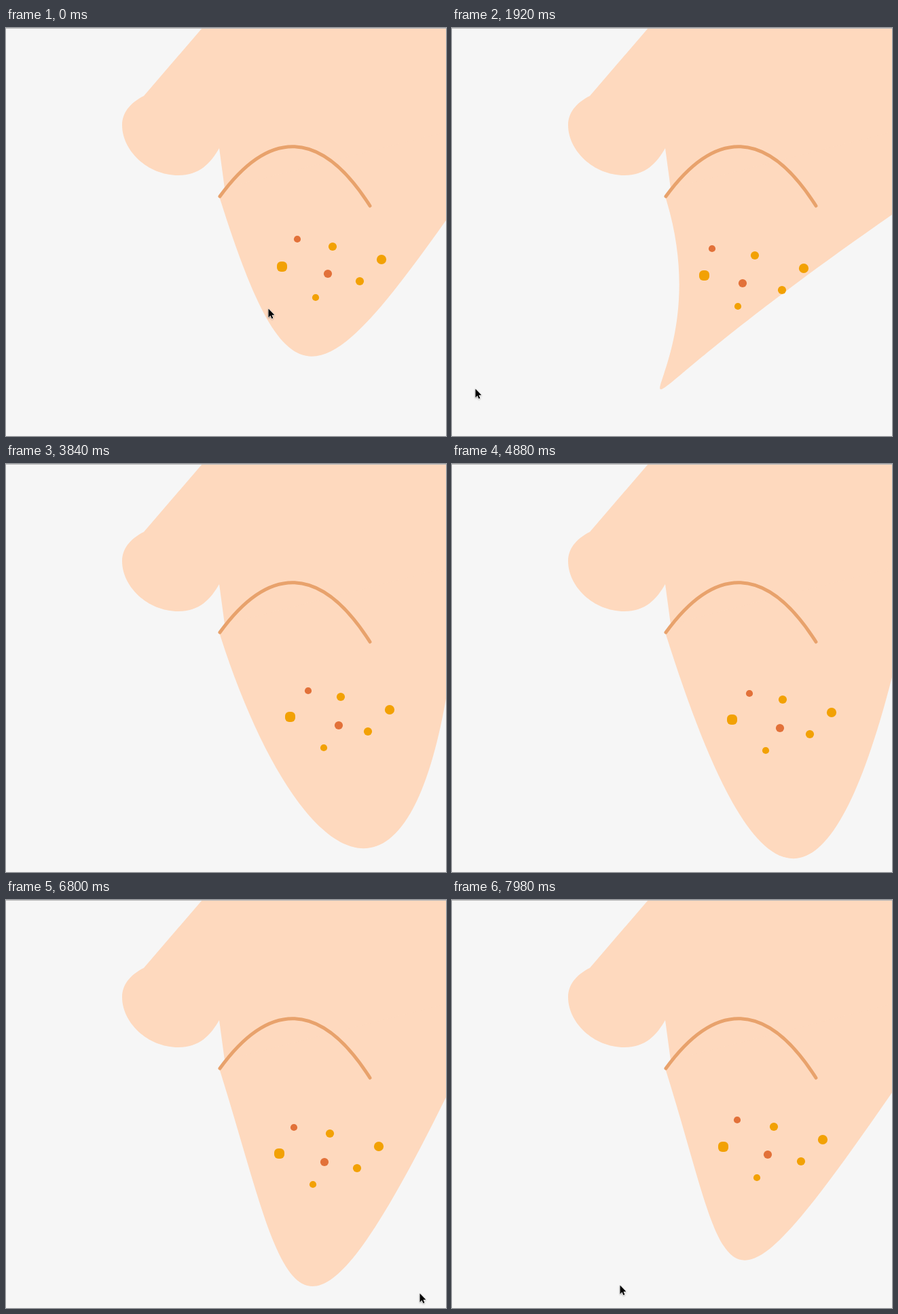
Recreate the animation shown at these times as an HTML page. Size 648 by 601 pixels, loop 8000 ms.

```html
<!DOCTYPE html>
<html lang="en">
<head>
<meta charset="utf-8">
<title>Wobbly chin</title>
<style>
  html, body { margin: 0; width: 100%; height: 100%; overflow: hidden; background: #f6f6f6; }
  svg { display: block; width: 100%; height: 100%; }
</style>
</head>
<body>
<svg viewBox="0 0 648 601">
  <defs>
    <filter id="shade" x="-50%" y="-50%" width="200%" height="200%">
      <feDropShadow dx="0" dy="1" stdDeviation="0.8" flood-color="#000" flood-opacity="0.35"/>
    </filter>
  </defs>
  <rect width="648" height="601" fill="#f6f6f6"/>
  <g fill="#fed9be">
    <path d="M289 0L203 100C187 108 171 122 171 143C171 180 208 217 254 217C284 217 301 200 314 177L322 236L420 300L660 267V0Z"/>
    <path id="chin"/>
  </g>
  <path d="M315 248C387 149 463 147 536 262" fill="none" stroke="#e8a26c" stroke-width="5" stroke-linecap="round"/>
  <g id="amber" fill="#f2a104">
    <circle cx="481" cy="322" r="6.1"/>
    <circle cx="553" cy="341" r="7.1"/>
    <rect x="399" y="344" width="15" height="15" rx="6"/>
    <circle cx="521" cy="373" r="6.1"/>
    <circle cx="456" cy="397" r="5.1"/>
  </g>
  <g id="red" fill="#e27139">
    <circle cx="429" cy="311" r="5.1"/>
    <circle cx="474" cy="362" r="6.1"/>
  </g>
  <rect width="648" height="1" fill="#b9b9b9"/>
  <g id="cursor" filter="url(#shade)">
    <path d="M.5 .5V13.4L3.4 10.6L5.4 15.1L7.4 14.3L5.4 9.8H9.4Z" fill="#000" stroke="#fff" paint-order="stroke"/>
  </g>
</svg>
<script>
  const LOOP = 8000, STEP = 147.8, LEAD = 14, LAST = 54;
  const REST = { x: 464, y: 545 };   // pull that leaves the dots in place
  const GRIP = { x: 77, y: 133 };    // pull relative to the pointer

  // Turning points of the pull on the chin: step, x, y
  const pull = [
    [1, 463, 546], [13, 76, 671], [14, 111, 664], [16, 327, 645], [18, 327, 645],
    [26, 601, 754], [33, 537, 790], [41, 103, 754], [43, 77, 730],
    [46, 419, 761], [47, 686, 712], [54, 384, 667], [55, 324, 700]
  ];

  const $ = id => document.getElementById(id);
  const chin = $('chin'), amber = $('amber'), red = $('red'), cursor = $('cursor');

  function slope(i, c) {
    const a = pull[Math.max(i - 1, 0)], b = pull[Math.min(i + 1, pull.length - 1)];
    return (b[c] - a[c]) / (b[0] - a[0]);
  }

  // Smooth cubic path through the turning points
  function pullAt(k) {
    let i = 0;
    while (i < pull.length - 2 && k >= pull[i + 1][0]) i++;
    const a = pull[i], b = pull[i + 1], h = b[0] - a[0];
    const s = Math.max(k - a[0], 0) / h, r = 1 - s;
    return [1, 2].map(c =>
      a[c] * r * r * (1 + 2 * s) + b[c] * s * s * (3 - 2 * s) +
      h * s * r * (slope(i, c) * r - slope(i + 1, c) * s));
  }

  function move(el, x, y) {
    el.setAttribute('transform', `translate(${Math.round(x)} ${Math.round(y)})`);
  }

  function draw(time) {
    const k = Math.min(Math.floor((time % LOOP + LEAD) / STEP), LAST);
    const [x, y] = pullAt(k);
    const dx = x - REST.x, dy = y - REST.y;
    chin.setAttribute('d', `M314 248C416 572 ${x} ${y} 659.5 267V150L322 236Z`);
    move(amber, dx * 0.089, dy * 0.101);
    move(red, dx * 0.118, dy * 0.109);

    // The chin trails the pointer by one step
    const [px, py] = pullAt(k + 1);
    move(cursor, px - GRIP.x, py - GRIP.y);
  }

  const start = performance.now();
  function tick() {
    draw(performance.now() - start);
    requestAnimationFrame(tick);
  }
  draw(0);
  requestAnimationFrame(tick);
</script>
</body>
</html>
```
